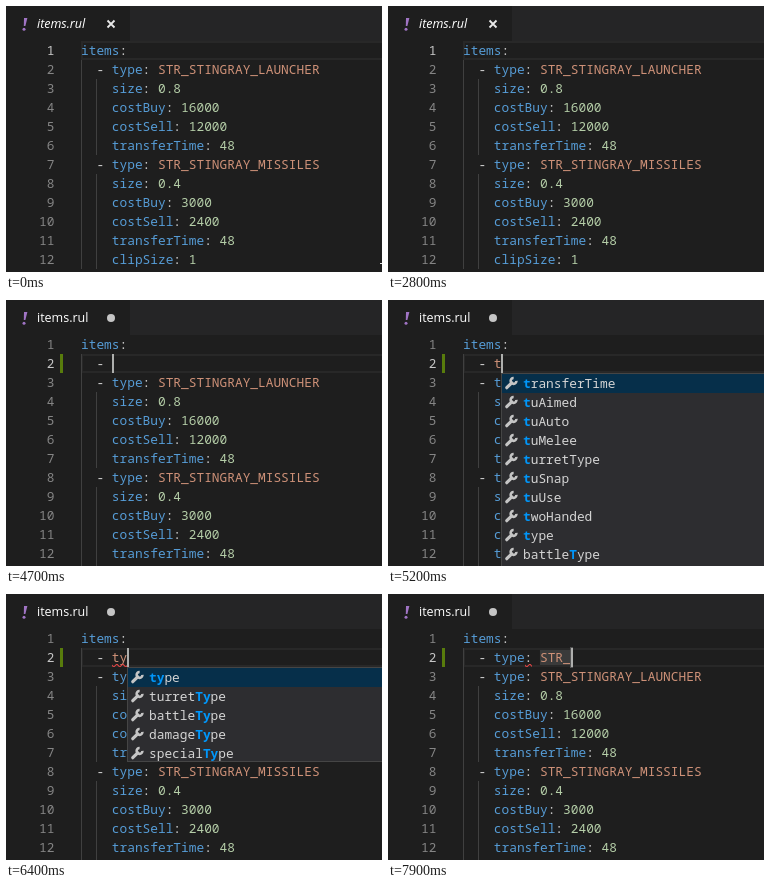
Recreate the animation shown at these times as an HTML page with a canvas. Size 376x266 px, loop 8000 ms.

```html
<!DOCTYPE html>
<html lang="en">
<head>
<meta charset="utf-8">
<title>Editor completion</title>
<style>
  html, body { margin: 0; width: 100%; height: 100%; overflow: hidden; background: #1e1e1e; }
  canvas { display: block; }
</style>
</head>
<body>
<canvas id="stage" width="376" height="266"></canvas>
<script>
const ctx = document.getElementById('stage').getContext('2d');
const W = 376, H = 266, LOOP = 8000;
const LEFT = 75, TOP = 35, ROW = 19, CHAR = 7.697, BASE = 14;
const MONO = '12.83px "Noto Sans Mono", "DejaVu Sans Mono", monospace';
const UI = '12.5px "Open Sans", "Noto Sans", sans-serif';
const PLAIN = '#d4d4d4', KEY = '#569cd6', STRING = '#ce9178', NUMBER = '#b5cea8';

const doc = [
  'items:',
  '  - type: STR_STINGRAY_LAUNCHER',
  '    size: 0.8',
  '    costBuy: 16000',
  '    costSell: 12000',
  '    transferTime: 48',
  '  - type: STR_STINGRAY_MISSILES',
  '    size: 0.4',
  '    costBuy: 3000',
  '    costSell: 2400',
  '    transferTime: 48',
  '    clipSize: 1'
];

// What the new second line holds from each time on
const typed = [
  [3000, ''], [3800, ' '], [3900, '  '], [4600, '  -'], [4700, '  - '],
  [5200, '  - t'], [5400, '  - ty'], [6700, '  - type: '],
  [7400, '  - type: S'], [7600, '  - type: ST'], [7700, '  - type: STR'], [7900, '  - type: STR_']
];
const caretToggles = [1300, 1800, 2300, 2800, 3000, 4400, 4600, 5900, 6400, 7200, 7400];

// Stars enclose the matched letters
const listT = ['*t*ransferTime', '*t*uAimed', '*t*uAuto', '*t*uMelee', '*t*urretType',
  '*t*uSnap', '*t*uUse', '*t*woHanded', '*t*ype', 'battle*T*ype', 'damage*T*ype'];
const listTy = ['*ty*pe', 'turret*Ty*pe', 'battle*Ty*pe', 'damage*Ty*pe', 'special*Ty*pe'];

const colX = col => LEFT + col * CHAR;
const rowY = row => TOP + row * ROW;

function box(x, y, w, h, color) {
  ctx.fillStyle = color;
  ctx.fillRect(x, y, w, h);
}

function mono(text, x, y, color, bold) {
  ctx.font = (bold ? 'bold ' : '') + MONO;
  ctx.fillStyle = color;
  [...text].forEach((c, i) => ctx.fillText(c, x + i * CHAR, y));
}

function poly(color, ...pts) {
  ctx.fillStyle = color;
  ctx.beginPath();
  for (let i = 0; i < pts.length; i += 2) ctx.lineTo(pts[i], pts[i + 1]);
  ctx.closePath();
  ctx.fill();
}

function disc(x, y, r, color) {
  ctx.fillStyle = color;
  ctx.beginPath();
  ctx.arc(x, y, r, 0, 7);
  ctx.fill();
}

function drawTabs(dirty) {
  box(0, 0, W, TOP, '#252526');
  box(0, 0, 124, TOP, '#1e1e1e');
  poly('#a074c4', 18, 12, 21.4, 12, 19.4, 20, 17.8, 20);
  disc(18, 23.2, 1.5, '#a074c4');
  ctx.font = (dirty ? '' : 'italic ') + UI;
  ctx.fillStyle = '#fff';
  ctx.fillText('items.rul', 31, 22);
  if (dirty) return disc(105, 18, 4, '#c5c5c5');
  ctx.strokeStyle = '#e8e8e8';
  ctx.lineWidth = 1.8;
  ctx.beginPath();
  ctx.moveTo(101.5, 14.5); ctx.lineTo(108.5, 21.5);
  ctx.moveTo(108.5, 14.5); ctx.lineTo(101.5, 21.5);
  ctx.stroke();
}

function drawCode(text, y) {
  for (const m of text.matchAll(/-|[\w.]+:?/g)) {
    const word = m[0], x = colX(m.index);
    if (word === '-') mono(word, x, y, PLAIN);
    else if (word.endsWith(':')) {
      mono(word.slice(0, -1), x, y, KEY);
      mono(':', x + (word.length - 1) * CHAR, y, PLAIN);
    } else mono(word, x, y, /^\d/.test(word) ? NUMBER : STRING);
  }
}

function drawLine(text, row, active) {
  const y = rowY(row), label = String(row + 1);
  if (active) {
    ctx.strokeStyle = '#282828';
    ctx.lineWidth = 2;
    ctx.strokeRect(LEFT + 1, y + 1, W, ROW - 2);
  }
  if (row > 0) box(LEFT, y, 1, ROW, '#404040');
  if (text.startsWith('    ')) box(90, y, 1, ROW, '#404040');
  mono(label, 48.5 - label.length * CHAR, y + BASE, active ? '#c6c6c6' : '#858585');
  drawCode(text, y + BASE);
}

function drawSquiggle(from, to) {
  const color = '#ea4646', x0 = Math.round(colX(from)), x1 = Math.round(colX(to));
  ctx.save();
  ctx.beginPath();
  ctx.rect(x0, 70, x1 - x0, 3);
  ctx.clip();
  for (let x = x0; x < x1; x += 6) {
    ctx.save();
    ctx.translate(x, 70);
    poly(color, 5.5, 0, 2.5, 3, 1.1, 3, 4.1, 0);
    poly(color, 4, 0, 6, 2, 6, 0.6, 5.4, 0);
    poly(color, 0, 2, 1, 3, 2.4, 3, 0, 0.6);
    ctx.restore();
  }
  ctx.restore();
}

function drawWrench(x, y) {
  ctx.save();
  ctx.translate(x, y);
  ctx.rotate(-Math.PI / 4);
  ctx.strokeStyle = '#c5c5c5';
  ctx.lineCap = 'round';
  ctx.lineWidth = 3.2;
  ctx.beginPath();
  ctx.moveTo(-6, 0); ctx.lineTo(1, 0);
  ctx.stroke();
  ctx.lineCap = 'butt';
  ctx.lineWidth = 2.6;
  ctx.beginPath();
  ctx.arc(3.6, 0, 2.9, 0.75, Math.PI * 2 - 0.75);
  ctx.stroke();
  ctx.restore();
}

function drawPopup(items, x) {
  const y = 73, h = items.length * ROW;
  ctx.save();
  ctx.beginPath();
  ctx.rect(x, y, W, h);
  ctx.clip();
  box(x, y, W, h, '#454545');
  box(x + 1, y + 1, W, h - 2, '#2d2d30');
  ctx.beginPath();
  ctx.rect(x + 1, y + 1, W, h - 2);
  ctx.clip();
  box(x + 1, y + 1, W, ROW, '#062f4a');
  items.forEach((item, i) => {
    const top = y + 1 + i * ROW;
    let tx = x + 22;
    drawWrench(x + 10, top + 9.5);
    item.split('*').forEach((part, k) => {
      mono(part, tx, top + BASE, k % 2 ? '#0097fb' : PLAIN, k % 2);
      tx += part.length * CHAR;
    });
  });
  ctx.restore();
}

function drawIBeam(x, y) {
  x = Math.round(x); y = Math.round(y);
  box(x, y - 7, 1, 14, '#e4e4e4');
  for (const s of [y - 8, y + 7]) {
    box(x - 3, s, 3, 1, '#e4e4e4');
    box(x + 1, s, 3, 1, '#e4e4e4');
  }
}

function drawArrow(x, y) {
  ctx.save();
  ctx.translate(Math.round(x), Math.round(y));
  ctx.strokeStyle = '#000';
  ctx.lineWidth = 1;
  poly('#fff', 0.5, 0.5, 0.5, 16.5, 4, 13, 6.5, 18.5, 8.5, 17.5, 6.2, 12.2, 11.5, 12.2);
  ctx.stroke();
  ctx.restore();
}

function drawPointer(t) {
  if (t >= 1600) return;
  if (t >= 1500) return drawIBeam(338, 112);
  const mix = (a, b, k) => a + (b - a) * k;
  const now = Math.min(800, Math.floor(t / 100) * 100);
  let x, y;
  if (now <= 600) {
    const k = now / 600, e = k * k * (3 - 2 * k);
    x = mix(377, 179, e);
    y = mix(265, 17, e);
  } else {
    const k = (now - 600) / 200;
    x = mix(179, 190, k);
    y = mix(17, 46, k);
  }
  (y < TOP ? drawArrow : drawIBeam)(x, y);
}

function draw(t) {
  const step = typed.filter(([at]) => at <= t).pop();
  const edited = Boolean(step), line = edited ? step[1] : doc[0];
  const row = edited ? 1 : 0;
  const lines = edited ? [doc[0], line, ...doc.slice(1)] : doc;
  const caretX = Math.round(colX(line.length)), caretY = rowY(row);

  box(0, 0, W, H, '#1e1e1e');
  drawTabs(edited);
  if (t >= 6700) box(colX(10), caretY, (line.length - 10) * CHAR, ROW, '#3a3a3a');
  lines.forEach((text, i) => drawLine(text, i, i === row));
  if (t >= 3200) box(54, rowY(1), 3, ROW, '#587c0c');
  if (t >= 7100) drawSquiggle(8, 9);
  else if (t >= 5700) drawSquiggle(4, 6);

  if (t >= 6700) {
    ctx.strokeStyle = '#525252';
    ctx.lineWidth = 1;
    ctx.strokeRect(caretX - 0.5, caretY - 0.5, 2, ROW + 1);
  }
  if (caretToggles.filter(at => at <= t).length % 2) box(caretX, caretY, 2, ROW, '#aeafad');
  if (t >= 5200 && t < 6700) drawPopup(t < 5400 ? listT : listTy, caretX);
  drawPointer(t);
}

const start = performance.now();
function tick() {
  draw((performance.now() - start) % LOOP);
  requestAnimationFrame(tick);
}
tick();
</script>
</body>
</html>
```
